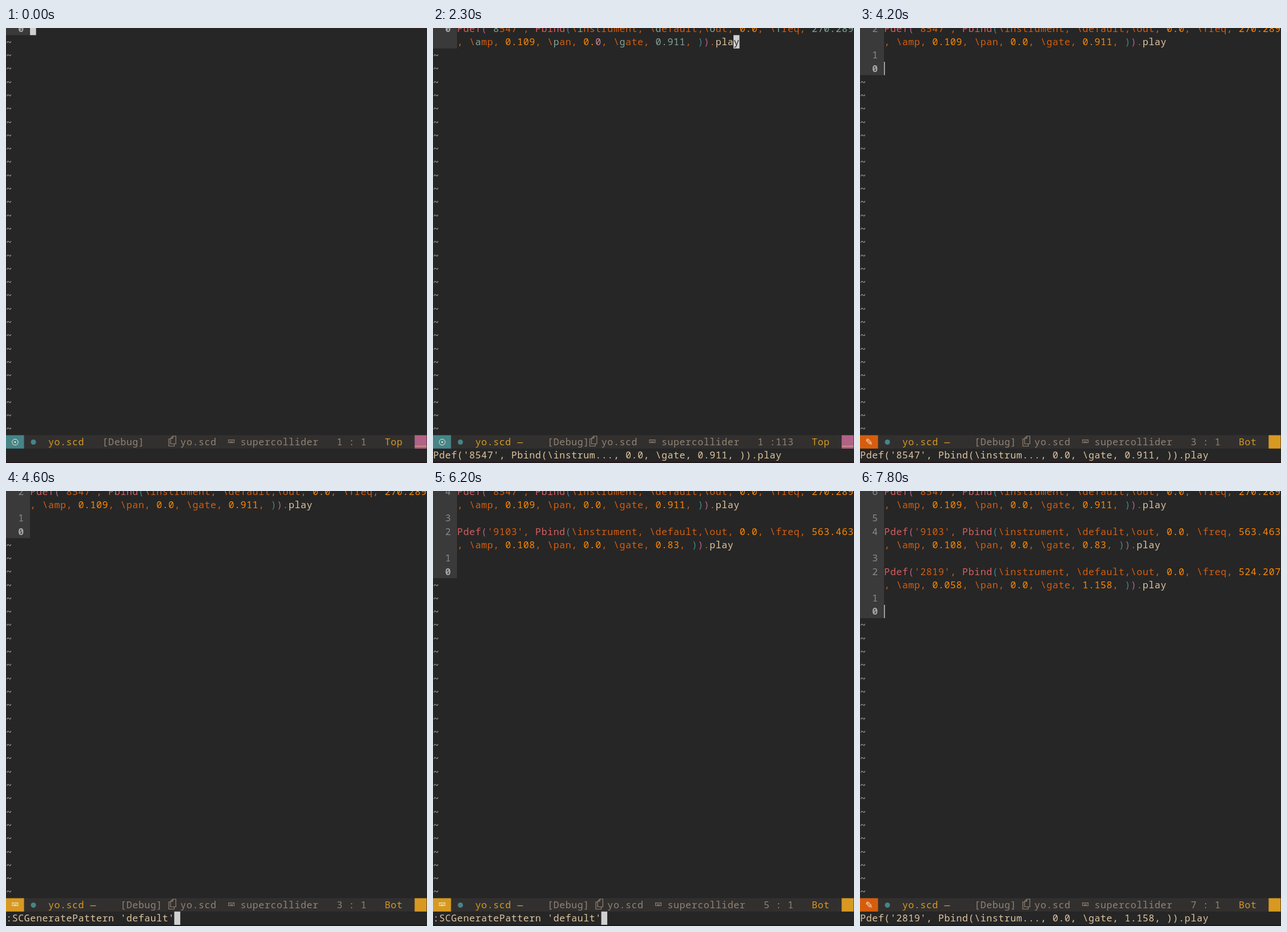
Animation of 737x760 px, one loop 8000 ms. Source, as an HTML page with a canvas:

```html
<!DOCTYPE html>
<html lang="en">
<head>
<meta charset="utf-8">
<title>Pattern generator</title>
<style>
html, body { margin: 0; width: 100%; height: 100%; overflow: hidden; background: #262626; }
canvas { display: block; }
</style>
</head>
<body>
<canvas id="stage" width="737" height="760"></canvas>
<script>
const ctx = document.getElementById('stage').getContext('2d');
const LOOP = 8000, COL = 10.52, ROW = 23.3, TOP = -10.85;
const MONO = '"Noto Sans Mono", "DejaVu Sans Mono", monospace';
const C = {
  bg: '#262626', gutter: '#3a3a3a', bar: '#32302f', dim: '#928374', num: '#8a8a8a',
  text: '#dfc5a0', cursor: '#d0d0d0', red: '#d75f5f', rust: '#d65d0e', orange: '#ff8700',
  teal: '#458588', pink: '#b16286', gold: '#d79921', hint: '#83a598', pale: '#f4e8d0'
};

// id, frequency, amplitude, gate
const patterns = [
  ['8547', '270.289', '0.109', '0.911'],
  ['9103', '563.463', '0.108', '0.83'],
  ['2819', '524.207', '0.058', '1.158']
];
const CMD = ":SCGeneratePattern 'default'";

// start time, generated patterns, mode, command line, cursor visible
const steps = [
  [0, 0, 'normal', '', 1], [200, 0, 'cmd', ':', 1], [500, 0, 'cmd', ':S', 1],
  [1000, 0, 'cmd', CMD, 1], [1600, 0, 'cmd', CMD, 0], [2100, 0, 'cmd', CMD, 1],
  [2300, 1, 'done', null, 1], [3100, 1, 'insert', null, 1], [3700, 1, 'insert', null, 0],
  [4200, 1, 'insert', null, 1], [4300, 1, 'normal', null, 1], [4500, 1, 'cmd', ':', 1],
  [4600, 1, 'cmd', CMD, 1], [4900, 2, 'done', null, 1], [5500, 2, 'done', null, 0],
  [5600, 2, 'insert', null, 1], [5900, 2, 'normal', null, 1], [6000, 2, 'cmd', ':', 1],
  [6200, 2, 'cmd', CMD, 1], [6400, 2, 'cmd', CMD, 0], [6500, 3, 'done', null, 1],
  [7700, 3, 'done', null, 0], [7800, 3, 'insert', null, 1]
];

const rowY = r => TOP + r * ROW;

function box(col, row, cols, color, rows = 1) {
  ctx.fillStyle = color;
  ctx.fillRect(col * COL, rowY(row), cols * COL, rows * ROW);
}

function put(text, col, row, color, weight = 400) {
  ctx.font = `${weight} 16.6px ${MONO}`;
  ctx.textAlign = 'center';
  ctx.fillStyle = color;
  [...text].forEach((ch, i) => ctx.fillText(ch, (col + i + .5) * COL, rowY(row) + 17.6));
}

function symbol(ch, x, y, size, color) {
  ctx.font = `${size}px "DejaVu Sans", sans-serif`;
  ctx.textAlign = 'center';
  ctx.fillStyle = color;
  ctx.fillText(ch, x, y);
}

function disc(x, y, r, color) {
  ctx.fillStyle = color;
  ctx.beginPath();
  ctx.arc(x, y, r, 0, 7);
  ctx.fill();
}

function keyboard(x, color) {
  ctx.strokeStyle = ctx.fillStyle = color;
  ctx.lineWidth = 1;
  ctx.strokeRect(x - 5, 719.5, 10, 5);
  for (let i = -3; i < 4; i += 2) ctx.fillRect(x + i - .5, 721, 1, 1);
  ctx.fillRect(x - 2.5, 722.6, 5, 1);
}

function pages(x) {
  ctx.strokeStyle = C.dim;
  ctx.lineWidth = 1.2;
  ctx.stroke(new Path2D(`M${x + 4} 718H${x + 1}V730.5H${x + 10.5}V727M${x + 4} 726.5V717l4-4h5.3v13.5zM${x + 4} 717h4v-4`));
}

function tokenColor(tok, depth) {
  if (/^P/.test(tok)) return C.red;
  if (/^\d/.test(tok)) return C.orange;
  if (tok === 'play') return C.text;
  if ('()'.includes(tok)) return depth === 1 ? C.pink : C.teal;
  return C.rust;
}

function drawPattern([id, freq, amp, gate], row, hinted) {
  const code = `Pdef('${id}', Pbind(\\instrument, \\default,\\out, 0.0, \\freq, ${freq}, \\amp, ${amp}, \\pan, 0.0, \\gate, ${gate}, )).play`;
  let pos = 0, depth = 0;
  for (const tok of code.match(/\\\w+|'\d+'|\d+\.\d+|\w+|./g)) {
    if (tok === '(') depth++;
    const base = tokenColor(tok, depth);
    if (tok === ')') depth--;
    [...tok].forEach((ch, i) => {
      let color = base;
      if (hinted) {
        if (/^[\\']/.test(tok) && i === 1 || tok === freq || tok === gate) color = C.hint;
        if (tok === '0.0' && pos > 66 && i === 2) color = '#d3869b';
      }
      put(ch, 4 + pos % 66, row + Math.floor(pos / 66), color);
      pos++;
    });
  }
  return code.length;
}

function drawStatus(n, mode, line, column) {
  const shift = column > 99 ? -1 : 0, first = line === 1;
  box(0, 31, 70, C.bar);
  box(0, 31, 3, { cmd: C.gold, insert: C.rust }[mode] || C.teal);
  if (mode === 'cmd') keyboard(16, C.pale);
  else if (mode === 'insert') symbol('✎', 16, 729, 16, C.pale);
  else {
    ctx.strokeStyle = C.pale;
    ctx.lineWidth = 1;
    ctx.beginPath();
    ctx.arc(16, 723.5, 5.2, 0, 7);
    ctx.stroke();
    disc(16, 723.5, 1.4, C.pale);
  }
  disc(48, 723.5, 4.5, C.teal);
  put(n ? 'yo.scd —' : 'yo.scd', 7, 31, C.gold);
  put('[Debug]', n ? 19 : 16, 31, C.dim);
  pages((27 + shift) * COL);
  put('yo.scd', 29 + shift, 31, C.dim);
  keyboard((37.5 + shift) * COL, C.dim);
  put('supercollider', 39 + shift, 31, C.dim);
  put(`${line} :${String(column).padStart(shift ? 3 : 2)}`, 55 + shift, 31, C.dim);
  put(first ? 'Top' : 'Bot', 63, 31, C.gold);
  box(68, 31, 2, first ? C.pink : C.gold);
  if (first) put('__', 68, 31, '#d79f86');
}

function draw(time) {
  const [, n, mode, command, cursorOn] = steps.findLast(s => s[0] <= time);
  const done = mode === 'done';
  const lastRow = done ? 3 * n - 2 : 3 * n;
  const line = done ? 2 * n - 1 : 2 * n + 1;
  let column = 1;

  ctx.fillStyle = C.bg;
  ctx.fillRect(0, 0, 737, 760);
  box(0, 0, 4, C.gutter, lastRow + 1);
  for (let r = lastRow + 1; r < 31; r++) put('~', 0, r + .03, '#949494', 700);

  for (let i = 1; i <= line; i++) {
    const row = Math.floor((i - 1) / 2) * 3 + (i % 2 ? 0 : 2);
    const current = i === line;
    put(String(line - i), 2, row, current ? '#a8a8a8' : C.num, current ? 700 : 400);
  }
  for (let i = 0; i < n; i++) {
    const length = drawPattern(patterns[i], 3 * i, done && i === n - 1);
    if (done) column = length;
  }

  if (cursorOn) {
    if (mode === 'normal') box(4, lastRow, 1, C.cursor);
    if (mode === 'insert') box(4, lastRow, .13, C.cursor);
    if (done) {
      box(column - 63, lastRow, 1, C.cursor);
      put('y', column - 63, lastRow, C.bg);
    }
  }

  drawStatus(n, mode, line, column);

  let message = command;
  if (command === null) {
    const [id, , , gate] = patterns[n - 1];
    const tail = `, 0.0, \\gate, ${gate}, )).play`;
    const head = `Pdef('${id}', Pbind(\\instrum...`;
    message = head + 'n'.repeat(58 - head.length - tail.length) + tail;
  }
  put(message, 0, 32, C.text);
  if (mode === 'cmd' && cursorOn) box(message.length, 32, 1, C.cursor);
  ctx.fillStyle = '#21171d';
  ctx.fillRect(0, 758, 737, 2);
}

const start = performance.now();
function tick() {
  draw((performance.now() - start) % LOOP);
  requestAnimationFrame(tick);
}
tick();
</script>
</body>
</html>
```
